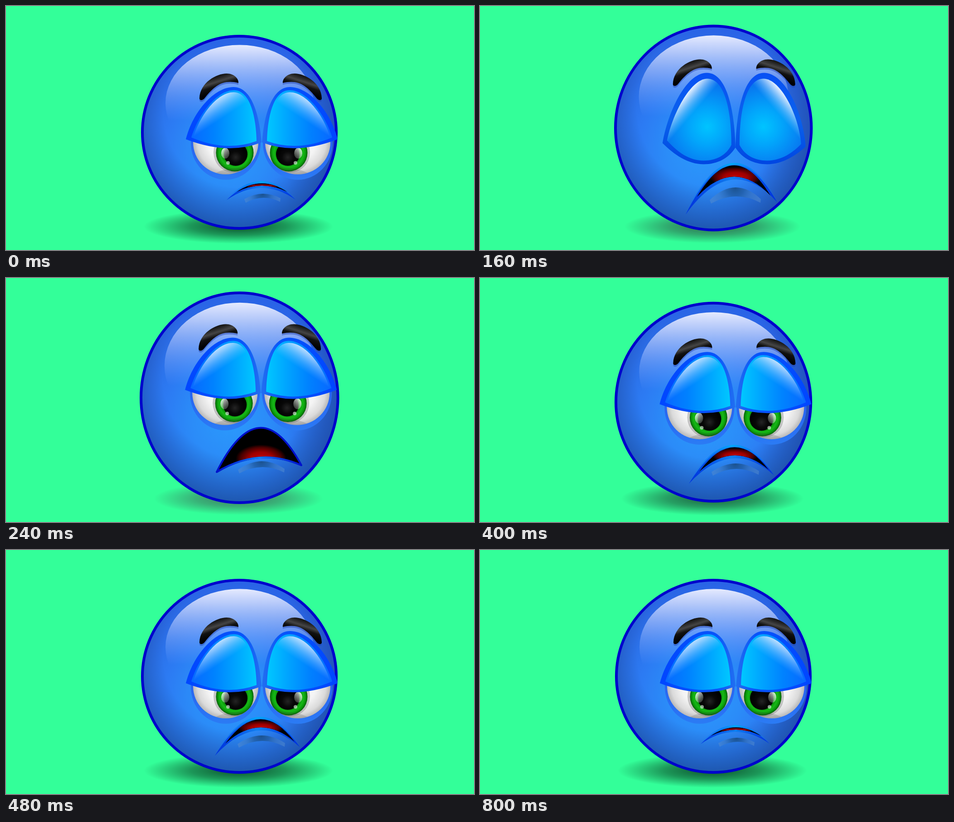
These frames come from a looping animation (1033x542 px, 2000 ms). An HTML page with a canvas:

```html
<!DOCTYPE html>
<html lang="en">
<head>
<meta charset="utf-8">
<title>Sad face</title>
<style>
html, body { margin: 0; width: 100%; height: 100%; overflow: hidden; background: #33ff99; }
canvas { display: block; }
</style>
</head>
<body>
<canvas id="stage" width="1033" height="542"></canvas>
<script>
const ctx = document.getElementById('stage').getContext('2d');
const LOOP = 2000, STEP = 80, REST_FROM = 800;

// Each mouth: outer corners, inner corners, arch peaks, lower lip and tongue.
const MOUTHS = {
  closed: { left: [487, 431], right: [639, 430], innerLeft: [509, 413], innerRight: [621, 413],
            top: 393, inner: 399, band: 404, lip: [526, 606, 437, 417, 426], tongue: [566, 400, 38, 5] },
  small:  { left: [461, 457], right: [649, 438], innerLeft: [484, 430], innerRight: [637, 426],
            top: 375, inner: 394, band: 401, lip: [511, 616, 439, 412, 424], tongue: [563, 395, 50, 17] },
  large:  { left: [454, 463], right: [656, 436], innerLeft: [479, 424], innerRight: [641, 421],
            top: 353, inner: 379, band: 386, lip: [507, 620, 439, 403, 423], tongue: [564, 380, 57, 23] },
  wide:   { left: [465, 431], right: [652, 416], top: 333, inner: 399,
            lip: [512, 615, 434, 407, 420], tongue: [563, 401, 56, 31] }
};

const POSES = [
  { stretch: 0, mouth: 'closed', open: true },
  { stretch: 1, mouth: 'small', open: true },
  { stretch: 2, mouth: 'large', shut: true },
  { stretch: 3, mouth: 'wide', open: true },
  { stretch: 2, mouth: 'large', shut: true },
  { stretch: 1, mouth: 'small', open: true },
  { stretch: 0, mouth: 'small', open: true },
  { stretch: 0, mouth: 'small', open: true, shut: true }
];

const BROW = new Path2D('M427 205C428 170 465 150 487 150C505 150 514 163 513 171C480 163 462 175 439 204C434 211 427 210 427 205Z');
const LID = {
  rim: new Path2D('M397 296C412 235 460 180 502 180C545 180 560 250 564 303Q490 332 397 296Z'),
  skin: new Path2D('M409 292C425 240 465 187 503 187C540 187 552 250 553 300Q485 325 409 292Z')
};

function withStops(gradient, stops) {
  for (const [at, color] of stops) gradient.addColorStop(at, color);
  return gradient;
}
const linear = (x0, y0, x1, y1, ...stops) => withStops(ctx.createLinearGradient(x0, y0, x1, y1), stops);
const radial = (x, y, r, ...stops) => withStops(ctx.createRadialGradient(x, y, 0, x, y, r), stops);

function fill(style, path) {
  ctx.fillStyle = style;
  ctx.fill(path);
}

function stroke(style, width, path) {
  ctx.strokeStyle = style;
  ctx.lineWidth = width;
  ctx.stroke(path);
}

function oval(x, y, rx, ry = rx) {
  const path = new Path2D();
  path.ellipse(x, y, rx, ry, 0, 0, Math.PI * 2);
  return path;
}

function group(draw) {
  ctx.save();
  draw();
  ctx.restore();
}

function mirrored(axis, draw) {
  group(() => draw(false));
  group(() => {
    ctx.translate(axis, 0);
    ctx.scale(-1, 1);
    draw(true);
  });
}

function drawShadow(s) {
  group(() => {
    ctx.translate(513, 490);
    ctx.scale(209 - 7.5 * s, 38 - s * 0.6);
    const tone = `${22 * s},${25 + 12 * s},${10 + 20 * s}`;
    const dark = 0.76 - 0.03 * s;
    fill(radial(0, 0, 1, [0, `rgba(${tone},${dark})`], [0.5, `rgba(${tone},${dark * 0.6})`],
      [1, `rgba(${tone},0)`]), oval(0, 0, 1));
  });
}

function drawBall(s) {
  const left = 298 - s, right = 732 + 1.2 * s, top = 64 - 11.3 * s, bottom = 497 + 1.7 * s;
  const cx = (left + right) / 2, cy = (top + bottom) / 2;
  const rx = (right - left) / 2, ry = (bottom - top) / 2;
  group(() => {
    ctx.translate(cx, cy);
    ctx.scale(rx / 217, ry / 216.5);
    ctx.translate(-515, -280.5);
    const ball = oval(515, 280.5, 214, 213.5);
    fill(radial(495, 325, 275, [0, '#2a9afc'], [0.3, '#2b8cf8'], [0.52, '#2c7bf3'],
      [0.75, '#2b6ce4'], [1, '#2960e8']), ball);
    fill(radial(515, 235, 262, [0.64, 'rgba(22,70,140,0)'], [1, 'rgba(22,70,140,.65)']), ball);
    fill(linear(620, 0, 732, 0, [0, 'rgba(30,70,160,0)'], [1, 'rgba(30,70,160,.4)']), ball);
    fill(linear(0, 86, 0, 256, [0, 'rgba(236,239,255,.97)'], [0.2, 'rgba(215,224,255,.8)'],
      [0.5, 'rgba(170,195,255,.56)'], [0.8, 'rgba(130,175,255,.25)'], [1, 'rgba(110,160,255,0)']),
      oval(515.5, 215.5, 163.5, 129));
  });
  stroke('#0000cc', 6, oval(cx, cy, rx - 3, ry - 3));
}

function drawBrow() {
  group(() => {
    ctx.translate(0, 4);
    fill('rgba(35,65,175,.45)', BROW);
  });
  fill(linear(462, 150, 475, 190, [0, '#000'], [0.25, '#222'], [0.45, '#454545'], [0.65, '#111'], [1, '#000']), BROW);
}

function drawEye() {
  fill(linear(0, 300, 0, 386, [0, '#2864ef'], [0.7, '#2a72f5'], [1, '#2b7cf4']), oval(485, 304, 77, 82));
  const white = oval(485, 303, 72, 71);
  fill(radial(485, 302, 73, [0, '#fff'], [0.55, '#f4f4f4'], [0.85, '#dadada'], [1, '#b5b5b5']), white);
  group(() => {
    ctx.clip(white);
    fill('rgba(120,120,120,.38)', oval(502, 325, 44, 45));
    fill(radial(505, 326, 41.5, [0, '#063d06'], [0.6, '#078a07'], [0.78, '#17b917'], [0.9, '#0b9a0b'], [1, '#045d04']),
      oval(505, 326, 41.5));
    fill('rgba(70,70,70,.18)', oval(525, 386, 75, 27));
  });
  fill(radial(507, 336, 26, [0, '#242424'], [0.5, '#080808'], [1, '#000']), oval(507, 329, 26));
  fill(linear(477, 318, 494, 334, [0, 'rgba(255,255,255,.85)'], [1, 'rgba(200,220,200,.2)']), oval(484, 327, 9, 12));
  fill('rgba(220,245,220,.65)', oval(490, 348.5, 4));
}

const sheen = (x0, y0, x1, y1) => linear(x0, y0, x1, y1, [0, 'rgba(236,244,255,.92)'],
  [0.3, 'rgba(205,230,255,.65)'], [1, 'rgba(120,200,255,0)']);

function drawOpenLid() {
  fill(linear(397, 0, 564, 0, [0, '#0046ff'], [0.75, '#0854fa'], [1, '#226ff0']), LID.rim);
  fill(linear(409, 0, 553, 0, [0, '#0868ff'], [0.35, '#0082ff'], [0.7, '#00a6ff'], [1, '#00c8ff']), LID.skin);
  ctx.translate(495, 275);
  ctx.scale(0.95, 0.95);
  ctx.translate(-495, -275);
  fill(sheen(445, 210, 472, 251), LID.skin);
}

function drawShutLid(isRight) {
  const [x, y] = isRight ? [410, 344] : [404, 336];
  const rim = new Path2D(`M${x} ${y}C415 270 455 180 502 180C545 180 563 260 565 346C550 370 525 383 495 383C460 383 430 362 ${x} ${y}Z`);
  const skin = new Path2D(`M${x + 10} ${y - 6}C425 275 465 193 503 193C540 193 556 260 556 340C545 363 522 375 495 375C462 375 436 355 ${x + 10} ${y - 6}Z`);
  fill(linear(0, 180, 0, 383, [0, '#0850f4'], [0.5, '#0a62ec'], [1, '#0046e2']), rim);
  fill(radial(503, 300, 98, [0, '#00c4ff'], [0.4, '#02a6fb'], [0.75, '#0688f4'], [1, '#0873ee']), skin);
  fill(sheen(448, 241, 476, 265), skin);
}

// Quadratic arch that reaches the given height halfway between its ends.
function arch(path, from, to, peak) {
  path.quadraticCurveTo((from[0] + to[0]) / 2, 2 * peak - (from[1] + to[1]) / 2, ...to);
}

function archLine(from, to, peak) {
  const path = new Path2D();
  path.moveTo(...from);
  arch(path, from, to, peak);
  return path;
}

function crescent(left, right, top, bottom) {
  const path = archLine(left, right, top);
  arch(path, right, left, bottom);
  path.closePath();
  return path;
}

function drawLip([x0, x1, y, top, bottom]) {
  const lowLeft = [x0 + 3, y], lowRight = [x1 - 1, y - 2];
  const path = archLine([x0, y - 8], [x1, y - 10], top);
  path.lineTo(...lowRight);
  arch(path, lowRight, lowLeft, bottom);
  path.closePath();
  fill(radial((x0 + x1) / 2, top, (x1 - x0) / 2, [0, 'rgba(25,78,135,.95)'], [0.35, 'rgba(33,92,160,.75)'],
    [0.7, 'rgba(65,125,195,.5)'], [1, 'rgba(85,140,205,.5)']), path);
}

function drawMouth(m) {
  drawLip(m.lip);
  const { left, right } = m;
  const across = (...stops) => linear(left[0], 0, right[0], 0, ...stops);
  const isWide = !m.innerLeft;
  const hole = isWide ? crescent(left, right, m.top, m.inner)
    : crescent(m.innerLeft, m.innerRight, m.top + 1, m.inner);
  if (!isWide) {
    stroke(across([0, 'rgba(0,110,255,0)'], [0.3, '#0a82f4'], [0.5, '#02a8fc'], [0.7, '#0a82f4'],
      [1, 'rgba(0,110,255,0)']), 4, archLine(left, right, m.top - 2));
    fill(across([0, '#0030dc'], [0.28, '#0658ea'], [0.5, '#1080f0'], [0.72, '#0658ea'], [1, '#0030dc']),
      crescent(left, right, m.top, m.band));
  }
  fill('#000', hole);
  group(() => {
    ctx.clip(hole);
    const [x, y, rx, ry] = m.tongue;
    ctx.translate(x, y);
    ctx.scale(rx, ry);
    fill(radial(0, 0, 1, [0, '#c00000'], [0.45, '#a00000'], [0.8, '#4a0000'], [1, '#000']), oval(0, 0, 1));
  });
  if (isWide) {
    ctx.lineJoin = 'round';
    stroke('#0010cc', 4, hole);
    stroke(across([0, '#0010cc'], [0.25, '#0440e0'], [0.5, '#1080f0'], [0.75, '#0440e0'], [1, '#0010cc']),
      4, archLine(left, right, m.inner));
  }
}

function poseAt(time) {
  if (time >= REST_FROM) return POSES[0];
  return POSES[Math.min(Math.floor(time / STEP), POSES.length - 1)];
}

function draw(time) {
  const pose = poseAt(time % LOOP);
  const s = pose.stretch;
  ctx.fillStyle = '#33ff99';
  ctx.fillRect(0, 0, 1033, 542);
  drawShadow(s);
  drawBall(s);
  group(() => {
    ctx.translate(-0.6 * s, -15.8 * s);
    if (pose.open) {
      mirrored(1129, drawEye);
      mirrored(1129, drawOpenLid);
    }
    if (pose.shut) mirrored(1130, drawShutLid);
    mirrored(1124, drawBrow);
  });
  drawMouth(MOUTHS[pose.mouth]);
}

let start;
function tick(now) {
  start ??= now;
  draw(Math.max(0, now - start));
  requestAnimationFrame(tick);
}
draw(0);
requestAnimationFrame(tick);
</script>
</body>
</html>
```
